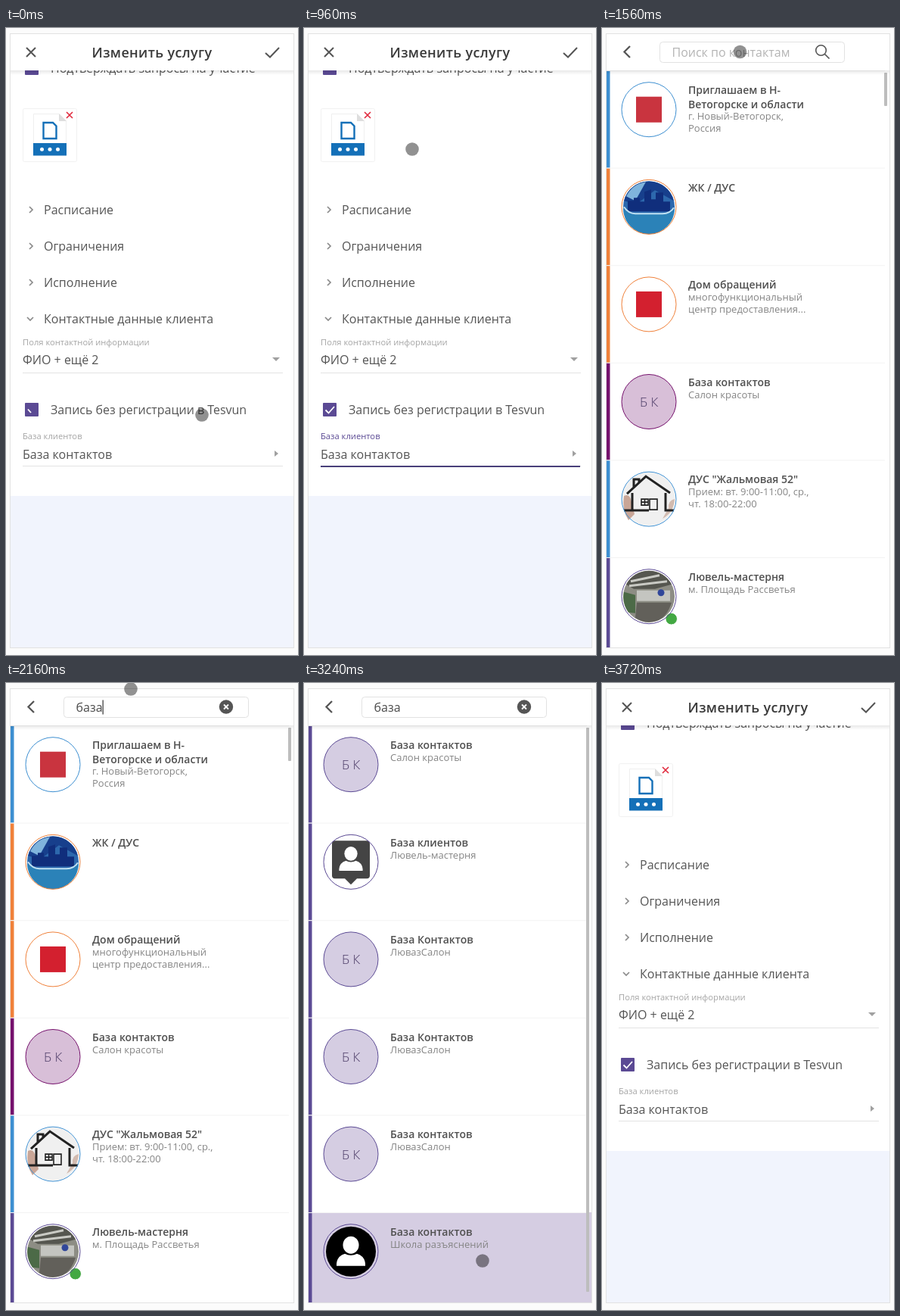
An HTML page for the animation above (3960 ms loop, 386 by 828 pixels).

```html
<!DOCTYPE html>
<html lang="ru">
<head>
<meta charset="utf-8">
<style>
  html, body { margin: 0; width: 100%; height: 100%; overflow: hidden; background: #fbfbfb; }
  svg { display: block; font: 16px "Open Sans", sans-serif; fill: #555; }
  .line { fill: none; stroke: #555; stroke-width: 2; }
  .thin { fill: none; stroke: #8a8a8a; stroke-width: 1.7; }
  .label { font-size: 11.2px; fill: #a5a5a5; }
  .name { font-size: 14px; font-weight: 600; fill: #505050; }
  .note { font-size: 13px; fill: #858585; }
  .initials { font-size: 17px; font-weight: 300; text-anchor: middle; fill: #4d3d68; }
  .focus .label { fill: #5b4a94; }
</style>
</head>
<body>
<svg id="stage" width="386" height="828" viewBox="0 0 386 828"></svg>
<script>
const STEP = 120, STEPS = 33;
const PURPLE = '#5b4a94', LILAC = '#d5cde2', BLUE = '#3d8fd1', ORANGE = '#f0813a', PLUM = '#75106c';
const QUERY = 'база';

const text = (x, y, s, cls = '') => `<text x="${x}" y="${y}" class="${cls}">${s}</text>`;
const rect = (x, y, w, h, fill, more = '') =>
  `<rect x="${x}" y="${y}" width="${w}" height="${h}" fill="${fill}" ${more}/>`;
const circle = (x, y, r, fill, more = '') => `<circle cx="${x}" cy="${y}" r="${r}" fill="${fill}" ${more}/>`;
const path = (d, more = 'class="line"') => `<path d="${d}" ${more}/>`;
const group = (id, s) => `<g id="${id}">${s}</g>`;

// Form
const section = (y, s) => path(`M31 ${y - 10}l4 4-4 4`, 'class="thin"') + text(50, y, s);
const checkbox = (y, s) => rect(25, y, 18, 18, PURPLE, 'rx="1"') + text(59, y + 15, s);
const underline = y => rect(22, y, 344, 1, '#e3e3e3');

const fileCard =
  rect(22.5, 106.5, 71, 70, '#fff', 'stroke="#f1f1f1" rx="2"') +
  path('M36.5 168V113.500H70l9.500 9.500V168z', 'fill="#fff" stroke="#efefef"') +
  path('M70 113v10h10z', 'fill="#dedede"') +
  rect(36, 152, 44, 16.5, '#1470b8') +
  [47.5, 58, 68.5].map(x => circle(x, 160.3, 2.5, '#fff')).join('') +
  path('M49.5 125H62l4.500 4.500V146h-17z', 'fill="none" stroke="#1470b8" stroke-width="2.4"') +
  path('M80 111l8 8m0-8l-8 8', 'stroke="#e0283c" stroke-width="1.6"');

const form =
  checkbox(44, 'Подтверждать запросы на участие') + fileCard +
  section(246, 'Расписание') + section(294, 'Ограничения') + section(342, 'Исполнение') +
  path('M28 382l4 4 4-4', 'class="thin"') + text(50, 390, 'Контактные данные клиента') +
  text(22, 419, 'Поля контактной информации', 'label') + text(22, 444, 'ФИО + ещё 2') +
  path('M352 435h10l-5 5z', 'fill="#a0a0a0"') + underline(455) +
  checkbox(495, 'Запись без регистрации в Tesvun') +
  path('', 'id="tick" fill="none" stroke="#fff" stroke-width="1.8"') +
  group('base', text(22, 543, 'База клиентов', 'label') + text(22, 569, 'База контактов') +
    path('M355 558v8l5-4z', 'fill="#a0a0a0"') + underline(578) +
    rect(22, 578, 343, 2, '#49407a', 'id="focusLine"')) +
  rect(6, 618, 374, 200, '#f1f4fd');

const formHead =
  path('M27 26l12 12m0-12l-12 12') + path('M343 33l6 5.500L361 26') +
  '<text x="193" y="39" text-anchor="middle" font-size="18" font-weight="600" letter-spacing=".35" fill="#3a3a3a">Изменить услугу</text>';

// Avatars, drawn around their own centre
const white = circle(0, 0, 36, '#fff');
const initials = fill => circle(0, 0, 36, fill) + text(0, 6.5, 'Б К', 'initials');
const mark = fill => white + rect(-17, -17, 34, 34, fill);
const person = (y, s) => `<g transform="translate(0 ${y}) scale(${s})" fill="#fff">` +
  '<ellipse cy="-8.5" rx="10.5" ry="11.5"/><path d="M-19 19v-3Q-18 6-8 3q8 4 16 0 10 3 11 13v3z"/></g>';

const skyline = white + circle(0, 0, 34, '#2d68ad') +
  path('M-33-8A34 34 0 0 1 33-8L8-22-16-4z', 'fill="#173f8c"') +
  path('M-30-14Q-22-30-4-33L-18-8z', 'fill="#7fb4dc"') +
  path('M-28 6V-8h8v-4h8v5h6v-13l9-3v13h6v-9h10v12h9V6z', 'fill="#102e7c"') +
  path('M-34 2Q-26 10-18 10H18Q28 10 34 2A34 34 0 0 1-34 2z', 'fill="#2b82b8"') +
  path('M-33 0Q-27 9-18 9H18Q28 9 33 1', 'fill="none" stroke="#bfe2f3" stroke-width="2"');

const house = circle(0, 0, 35, '#f0f0f0') +
  path('M-33-4q8-4 10 8l4 16-8 8Q-36 14-33-4z', 'fill="#c9a697"') +
  path('M34 0q-9 2-8 12l-8 14Q33 18 34 0z', 'fill="#d2bbb0"') +
  path('M-29-7L-4-30 28-8M-20-16v-10h7v4M-33 15h11V-8M22-8v23h11M-22 15H0',
    'fill="none" stroke="#222" stroke-width="3"') +
  path('M-10 0h9v8h-9zM-5.500 0v8M-10 4h9M1 0h10v14H1z', 'fill="none" stroke="#222" stroke-width="1.6"');

const interior = white + circle(0, 0, 34, '#8d8d84') +
  path('M-30-16A34 34 0 0 1 30-16L8-10h-28z', 'fill="#55564f"') +
  path('M-24-20L14-28M-26-14L24-20', 'stroke="#c9cac4" stroke-width="3"') +
  rect(-16, -8, 44, 14, '#c4c5c0') + circle(16, -5, 4.5, '#31479a') +
  path('M-33-6l15 4v24l-9-1A34 34 0 0 1-33-6z', 'fill="#4c6a47"') +
  path('M-16 8h46Q22 34 0 34-10 34-18 28z', 'fill="#62605a"') +
  circle(29.7, 29.5, 7.8, '#43a843', 'stroke="#fff" stroke-width="1"');

const pin = white +
  path('M-21-28h42q4 0 4 4v42q0 4-4 4H8L0 30l-8-8h-13q-4 0-4-4v-42q0-4 4-4z', 'fill="#444"') + person(-4, .82);
const user = circle(0, 0, 36, LILAC) + circle(0, 0, 33, '#000') + person(0, 1);

// Contact lists
const row = ([color, avatar, names, notes], i) => {
  const y = 56 + i * 128.6;
  const noteY = y + 29 + 18 * names.length;
  return rect(6, y, 368, 1, '#f3f3f3') + rect(6, y + 1, 4.5, Math.min(127.6, 817 - y), color) +
    `<g transform="translate(62 ${y + 51.7})">${avatar}${circle(0, 0, 36, 'none', `stroke="${color}"`)}</g>` +
    names.map((s, n) => text(114, y + 31 + 18.5 * n, s, 'name')).join('') +
    notes.map((s, n) => text(114, noteY + 16 * n, s, 'note')).join('');
};
const scrollbar = h => rect(373, 59, 4, h, '#bdbdbd', 'rx="1"');

const allRows = [
  [BLUE, mark('#c9343f'), ['Приглашаем в Н-', 'Ветогорске и области'], ['г. Новый-Ветогорск,', 'Россия']],
  [ORANGE, skyline, ['ЖК / ДУС'], []],
  [ORANGE, mark('#d3202f'), ['Дом обращений'], ['многофункциональный', 'центр предоставления...']],
  [PLUM, initials('#d8bfd8'), ['База контактов'], ['Салон красоты']],
  [BLUE, house, ['ДУС "Жальмовая 52"'], ['Прием: вт. 9:00-11:00, ср.,', 'чт. 18:00-22:00']],
  [PURPLE, interior, ['Лювель-мастерня'], ['м. Площадь Рассветья']]
];
const found = [
  ['База контактов', 'Салон красоты', initials(LILAC)],
  ['База клиентов', 'Лювель-мастерня', pin],
  ['База Контактов', 'ЛювазСалон', initials(LILAC)],
  ['База Контактов', 'ЛювазСалон', initials(LILAC)],
  ['База контактов', 'ЛювазСалон', initials(LILAC)],
  ['База контактов', 'Школа разъяснений', user]
].map(([name, note, avatar]) => [PURPLE, avatar, [name], [note]]);

const searchHead =
  path('M37 24l-7.500 7.500L37 39', 'class="line" style="stroke-width:2.3"') +
  rect(76.5, 18.5, 244, 27, '#fff', 'rx="4" stroke="#e2e2e2"') +
  group('empty', '<text x="92.5" y="38" fill="#b4b4b4">Поиск по контактам</text>' +
    circle(289.5, 29.5, 6.8, 'none', 'stroke="#555" stroke-width="1.6"') +
    path('M294.500 34.500l6 6', 'stroke="#555" stroke-width="1.7"')) +
  group('filled', circle(291, 31.5, 9.2, '#555') +
    path('M288 28.500l6 6m0-6l-6 6', 'stroke="#fff" stroke-width="1.8"')) +
  '<text id="typed" x="92.5" y="38" fill="#4c4c4c"></text>' + rect(0, 22.5, 1.2, 19, '#333', 'id="caret"');

const stage = document.getElementById('stage');
stage.innerHTML =
  '<defs><linearGradient id="shade" x2="0" y2="1"><stop stop-opacity=".09"/><stop offset="1" stop-opacity="0"/></linearGradient></defs>' +
  rect(0, 0, 386, 828, '#fbfbfb') + rect(5.5, 7.5, 375, 811, '#fff') +
  group('form', form) +
  group('all', allRows.map(row).join('') + scrollbar(44)) +
  group('results', rect(6, 699, 374, 119, LILAC) + found.map(row).join('') + scrollbar(745)) +
  rect(6, 8, 374, 48, '#fff') + rect(6, 56, 374, 6, 'url(#shade)') +
  group('formHead', formHead) + group('searchHead', searchHead) +
  rect(5.5, 7.5, 375, 811, 'none', 'stroke="#e2e2e2"') +
  circle(0, 0, 8.8, '#000', 'id="pointer" fill-opacity=".43"');

const $ = id => document.getElementById(id);
const show = (id, on) => $(id).style.display = on ? '' : 'none';

// Pointer stops: step, x, y
const stops = [
  [0, 259, 511], [1, 263, 500], [3, 160, 35], [5, 150, 568], [6, 150, 566], [8, 143, 160],
  [9, 228, 412], [10, 220, 330], [12, 185, 33], [14, 180, 30], [18, 165, 8], [20, 161, 36],
  [22, 161, 39], [25, 246, 745], [27, 236, 763], [28, 240, 740], [30, 262, 500]
];
function pointerAt(k) {
  const n = stops.findIndex(s => s[0] >= k);
  if (n <= 0) return stops[0].slice(1);
  const [k0, x0, y0] = stops[n - 1], [k1, x1, y1] = stops[n];
  const p = (k - k0) / (k1 - k0);
  return [x0 + (x1 - x0) * p, y0 + (y1 - y0) * p];
}

function draw(k) {
  const onForm = k < 9 || k >= 28;
  const focus = k >= 6 && k < 9;
  const typed = QUERY.slice(0, Math.max(0, k - 14));
  show('form', onForm);
  show('formHead', onForm);
  show('searchHead', !onForm);
  show('all', !onForm && k < 20);
  show('results', !onForm && k >= 20);

  $('tick').setAttribute('d', k ? 'M28.500 504.500l4 4 7.500-8.500' : 'M29 503.500l4 4.500');
  $('base').setAttribute('class', focus ? 'focus' : '');
  show('focusLine', focus);

  show('empty', !typed);
  show('filled', typed);
  $('typed').textContent = typed;
  show('caret', k >= 14 && k < 24);
  $('caret').setAttribute('x', 92.5 + (typed ? $('typed').getComputedTextLength() : 0));

  show('pointer', k < 31);
  if (k < 31) $('pointer').setAttribute('transform', `translate(${pointerAt(k)})`);
}

const start = performance.now();
let last = -1;
function tick() {
  const k = Math.floor((performance.now() - start) / STEP) % STEPS;
  if (k !== last) draw(last = k);
  requestAnimationFrame(tick);
}
tick();
</script>
</body>
</html>
```
